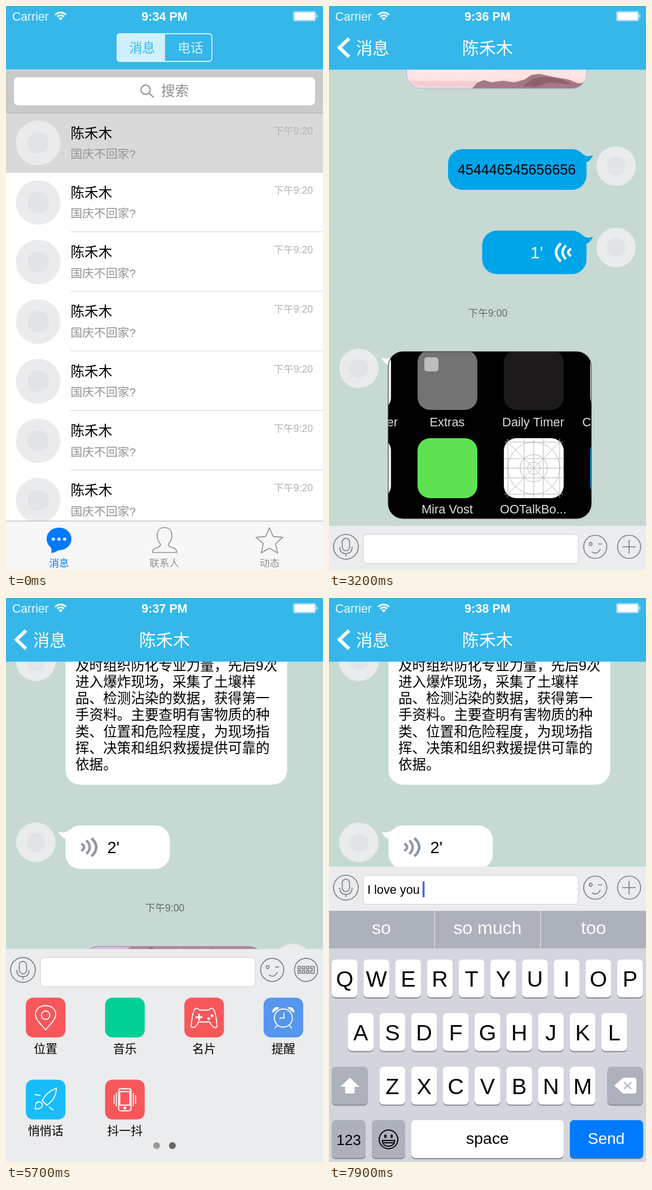
Recreate the animation shown at these times as an HTML page with a canvas. Size 562 by 997 pixels, loop 8 s.

```html
<!DOCTYPE html>
<html lang="zh-CN">
<head>
<meta charset="utf-8">
<title>Chat demo</title>
<style>
html, body { margin: 0; width: 100%; height: 100%; overflow: hidden; }
canvas { display: block; }
</style>
</head>
<body>
<canvas id="stage" width="562" height="997"></canvas>
<script>
const ctx = document.getElementById('stage').getContext('2d');
const LOOP = 8000, W = 562, H = 997;
const BLUE = '#35b7ea', BUBBLE = '#00a4e9', GRAY = '#929292', BAR = '#ebecee', KEY = '#adb1bc';
const CONTACT = '陈禾木';

// ---------- helpers ----------
function box(x, y, w, h, color, r = 0) {
  ctx.fillStyle = color;
  ctx.beginPath();
  ctx.roundRect(x, y, w, h, r);
  ctx.fill();
}
function frame(x, y, w, h, color, r, width = 1.5) {
  ctx.strokeStyle = color;
  ctx.lineWidth = width;
  ctx.beginPath();
  ctx.roundRect(x, y, w, h, r);
  ctx.stroke();
}
function text(s, x, y, size, color, align = 'left', weight = 300) {
  ctx.font = `${weight} ${size}px "Liberation Sans", "Noto Sans CJK SC", "Noto Sans CJK", sans-serif`;
  ctx.textAlign = align;
  ctx.fillStyle = color;
  ctx.fillText(s, x, y);
}
function fill(d, color) {
  ctx.fillStyle = color;
  ctx.fill(new Path2D(d));
}
function line(d, color, width = 1.6) {
  ctx.strokeStyle = color;
  ctx.lineWidth = width;
  ctx.stroke(new Path2D(d));
}
function oval(x, y, rx, ry, color) {
  ctx.fillStyle = color;
  ctx.beginPath();
  ctx.ellipse(x, y, rx, ry, 0, 0, 7);
  ctx.fill();
}
const disc = (x, y, r, color) => oval(x, y, r, r, color);
const ring = (x, y, r) => `M${x + r} ${y}a${r} ${r} 0 1 1 ${-2 * r} 0a${r} ${r} 0 1 1 ${2 * r} 0`;
function at(x, y, draw) {
  ctx.save();
  ctx.translate(x, y);
  draw();
  ctx.restore();
}
function gradient(x, y, ...stops) {
  const g = ctx.createLinearGradient(0, 0, x, y);
  stops.forEach(([p, c]) => g.addColorStop(p, c));
  return g;
}
function seeded(seed) {
  return () => (seed = (seed * 16807) % 2147483647) / 2147483647;
}

// ---------- shared parts ----------
function statusBar(clock) {
  text('Carrier', 11, 25.5, 21.2, '#eefaff');
  text(clock, 281, 25.5, 21.5, '#fff', 'center', 700);
  for (const r of [13, 8]) {
    ctx.strokeStyle = '#fff';
    ctx.lineWidth = 2.8;
    ctx.beginPath();
    ctx.arc(97, 24.5, r, -2.4, -0.74);
    ctx.stroke();
  }
  fill('M97 25.5l-4-4q4-3 8 0z', '#fff');
  frame(509.7, 9.7, 39.3, 16.6, '#ffffffb0', 3, 1.2);
  box(511, 11, 36.7, 14, '#fff', 2);
  box(550.5, 15, 1.7, 6, '#ffffffc0', 1);
}
function avatar(x, y, r) {
  disc(x, y, r, '#e9ebed');
  disc(x, y, r * 0.48, '#e1e3e5');
}

// ---------- conversation list ----------
function listScreen() {
  box(0, 0, W, H, '#fff');
  box(0, 189, W, 106, '#d9d9d9');
  for (let i = 0; i < 7; i++) {
    const y = 105.3 * i;
    avatar(57, 242 + y, 39.5);
    text(CONTACT, 114.5, 233.5 + y, 24.6, '#000');
    text('国庆不回家?', 114.5, 269 + y, 20.8, GRAY);
    text('下午9:20', 544, 226.5 + y, 17.6, '#b3b3b3', 'right');
    if (i) box(114.5, 293 + y, W, 1.7, '#e3e3e5');
  }
  box(0, 112, W, 77.5, '#c9cbcb');
  box(0, 188.5, W, 1.2, '#b4b6b7');
  box(14, 126, 534, 49.5, '#fff', 8);
  line(ring(247.5, 148, 8.2) + 'M253.5 154l8 7.5', '#8e8e93', 2);
  text('搜索', 275, 159, 24.6, '#8e8e93');

  box(0, 0, W, 112, BLUE);
  box(0, 112, W, 1, '#d5e3e8');
  box(196, 48, 86, 51, '#cff0fd', [6, 0, 0, 6]);
  frame(197, 49, 168, 49, '#cff0fd', 6, 1.8);
  text('消息', 241.5, 82, 22.8, BLUE, 'center');
  text('电话', 327, 82, 22.8, '#cff0fd', 'center');

  box(0, 910, W, 87, '#f7f7f7');
  box(0, 910, W, 1, '#a9a9a9');
  oval(94, 942, 22, 20, '#007aff');
  fill('M78 952q4 8 2 15q9-1 14-6z', '#007aff');
  for (const x of [84, 94, 104]) disc(x, 942.5, 2.8, '#fff');
  line('M281 922c-9 0-13 6-13 14 0 7 3 12 6 15 0 4-2 5-5 6-6 2-9 3-9 9h43c0-6-4-7-9-9-4-1-6-2-6-6 3-3 6-8 6-15 0-8-4-14-13-14z', GRAY, 1.7);
  const star = Array.from({ length: 10 }, (_, i) => {
    const r = i % 2 ? 11.5 : 24.5, a = i * Math.PI / 5;
    return [467 + r * Math.sin(a), 947 - r * Math.cos(a)];
  });
  line('M' + star.join('L') + 'z', GRAY, 1.7);
  ['消息', '联系人', '动态'].forEach((s, i) =>
    text(s, 94 + 186.7 * i, 990.5, 17.6, i ? GRAY : '#007aff', 'center'));
}

// ---------- chat bubbles ----------
// Body and tail of a bubble; left bubbles mirror right ones.
function bubblePath(x, y, w, h, left) {
  const body = new Path2D(), mx = v => left ? 561 - v : v;
  body.roundRect(x, y, w, h, 26);
  const tail = new Path2D(`M${mx(446)} ${y + 6}Q${mx(457)} ${y + 16} ${mx(468)} ${y + 10.5}Q${mx(465)} ${y + 21} ${mx(451)} ${y + 26}z`);
  return [body, tail];
}
function bubble(x, y, w, h, color, left) {
  ctx.fillStyle = color;
  bubblePath(x, y, w, h, left).forEach(p => ctx.fill(p));
}
function picture(x, y, w, h, tailColor, edge, left, draw) {
  const [body, tail] = bubblePath(x, y, w, h, left);
  ctx.fillStyle = tailColor;
  ctx.fill(tail);
  ctx.save();
  ctx.clip(body);
  at(x, y, draw);
  ctx.restore();
  ctx.strokeStyle = edge;
  ctx.lineWidth = 1;
  ctx.stroke(body);
}
function waves(x, y, dir, color, count) {
  const arcs = [[2, 7, 6.5, 4.2], [11, 17, 12, 4.2], [20, 28.5, 16, 4.6]];
  for (const [end, peak, h, width] of arcs.slice(0, count))
    line(`M${x + dir * end} ${y - h}Q${x + dir * (2 * peak - end)} ${y} ${x + dir * end} ${y + h}`, color, width);
}
const stamp = y => text('下午9:00', 281.5, y, 17.6, '#646b68', 'center');

function sky() {
  box(0, 0, 320, 323, gradient(0, 323, [0, '#dbb6db'], [0.2, '#e2c4e6'], [0.38, '#ebdcf4'], [0.58, '#f2e9f8'], [0.8, '#fceef4'], [0.93, '#fde6e4'], [1, '#f8cfd0']));
  ctx.filter = 'blur(9px)';
  oval(10, 25, 28, 34, '#d9cdf0');
  oval(170, 10, 130, 38, '#dab5da');
  oval(295, 35, 32, 35, '#d9c8ec');
  oval(265, 92, 26, 16, '#e0c0e3');
  oval(65, 110, 60, 20, '#ece2f8');
  oval(22, 150, 24, 12, '#edd6f0');
  oval(235, 158, 70, 18, '#efe6fa');
  ctx.filter = 'blur(3px)';
  oval(245, 279, 58, 7, '#fad9d9');
  oval(235, 291, 75, 5, '#fde0dd');
  ctx.filter = 'none';
  box(0, 309, 140, 8, '#f3cdd2');
  fill('M115 323l10-11 12-5 14 4 20-3 20 3 18-5 12-8 14-2 24 5 28 5 18 7 15-3v13z', '#a67883');
  fill('M205 318l20-14 24-3 30 6 14 8-40-4-24 8z', '#8d626e');
}

function lake() {
  const rnd = seeded(11);
  const treeTop = x => 62 + x * 0.12 + Math.max(0, x - 190) * 0.45;
  // mountain side
  box(0, 0, 320, 175, gradient(0, 175, [0, '#b38793'], [0.5, '#a27683'], [1, '#74535f']));
  fill('M0 0h85L55 17 25 24 0 42z', '#dbbdd3');
  for (let i = 0; i < 260; i++) {
    const x = rnd() * 320, y = Math.max(0, 85 - x) * 0.45 + 6 + rnd() * 130, s = 3 + rnd() * 11;
    fill(`M${x} ${y}l${s} ${-s * 0.6}l${s * 0.5} ${s * 0.3}l${-s} ${s * 0.7}z`, rnd() > 0.5 ? '#c598a570' : '#5c3e4a70');
  }
  // forest, thinning out towards the right
  let edge = 'M0 168';
  for (let x = 0; x <= 320; x += 4) edge += `L${x} ${treeTop(x) + 14 * rnd()}`;
  fill(edge + 'V168z', '#30222a');
  for (let i = 0; i < 190; i++) {
    const x = rnd() * 320, y = treeTop(x) + 2 + rnd() * (155 - treeTop(x)), s = 9 + rnd() * 14;
    fill(`M${x} ${y - s}l3 ${s}h-6z`, ['#241a20', '#30222a', '#3c2c34'][i % 3]);
  }
  for (let i = 0; i < 55; i++) {
    const x = rnd() * 280, y = treeTop(x) - rnd() * 34, s = 5 + rnd() * 7;
    fill(`M${x} ${y - s}l2.5 ${s}h-5z`, '#4a333d');
  }
  for (let i = 0; i < 40; i++) {
    const x = 205 + rnd() * 115;
    oval(x, 128 + rnd() * 34, 3 + rnd() * 5, 2 + rnd() * 2, i % 2 ? '#a87d8a' : '#49343d');
  }
  box(0, 164, 320, 4, '#6d505d');
  box(0, 168, 320, 8, '#a08ba6');
  // water with vertical reflections and stones
  box(0, 175, 320, 170, gradient(0, 345, [0.5, '#45323b'], [0.7, '#533c45'], [0.85, '#6e4f5a'], [1, '#6d4d57']));
  box(0, 175, 320, 170, gradient(320, 0, [0, '#2a1d2440'], [0.55, '#6a4b5600'], [0.75, '#9a748060'], [1, '#8b667260']));
  ctx.filter = 'blur(2px)';
  for (let i = 0; i < 60; i++) {
    const x = rnd() * 320;
    box(x, 178 + rnd() * 30, 2 + rnd() * 7, 30 + rnd() * 55, x > 195 ? '#a27b8730' : '#2d202730');
  }
  ctx.filter = 'none';
  for (const [x, y, r] of [[12, 234, 12], [164, 217, 9], [90, 275, 15], [28, 286, 30], [200, 293, 22], [154, 250, 20], [300, 290, 30], [124, 299, 34], [292, 208, 8], [40, 240, 14], [260, 282, 12]]) {
    oval(x, y, r, r * 0.18, '#36262ed0');
    oval(x, y - 2, r * 0.6, 1.2, '#85626e80');
  }
}

function homeScreen() {
  const label = (s, x, y, align = 'center') => text(s, x, y, 21.9, '#ddd', align);
  box(0, 0, 360, 295, '#000');
  box(-101, -3, 106, 106, '#eee', 22);
  box(-101, 153, 106, 106, '#eee', 22);
  box(358, -3, 106, 106, '#ddd', 22);
  box(358, 153, 106, 106, BUBBLE, 22);
  box(52, -3, 106, 106, '#737373', 22);
  box(64, 10, 25, 25, '#bdbdbd', 5);
  box(205, -3, 106, 106, '#1c1a1b', 22);
  box(52, 153, 106, 106, '#5ee253', 22);
  box(205, 153, 106, 106, '#fff', 22);
  at(258, 206, () => {
    let d = ring(0, 0, 11) + ring(0, 0, 24) + ring(0, 0, 46) + 'M-47-47L47 47M47-47L-47 47';
    for (const p of [-46, -17, 0, 17, 46]) d += `M${p}-52V52M-52 ${p}H52`;
    line(d, '#b5b5b5', 1);
  });
  label('er', 17, 132, 'right');
  label('Extras', 104.5, 132);
  label('Daily Timer', 257, 132);
  label('C', 344, 132, 'left');
  label('Mira Vost', 104.5, 286);
  label('OOTalkBo...', 257, 286);
}

function earlierMessages(bars) {
  picture(137.5, 136, 319, 322, '#d8c9ee', '#9bbcf0', false, sky);
  avatar(509, 165, 35);
  bubble(211, 565, 245.5, 72, BUBBLE);
  text('454446545656656', 228, 610, 25.1, '#000');
  avatar(509, 595, 35);
  bubble(271.5, 709, 185, 77, BUBBLE);
  text("1'", 357, 758, 30, '#fff');
  waves(431, 747.5, -1, '#fff', bars);
  avatar(509, 739, 35);
  stamp(861);
  avatar(53, 952.5, 35);
  picture(105, 923, 360, 295, '#fff', '#222', true, homeScreen);
}

const REPORT = ['及时组织防化专业力量，先后9次', '进入爆炸现场，采集了土壤样', '品、检测沾染的数据，获得第一',
  '手资料。主要查明有害物质的种', '类、位置和危险程度，为现场指', '挥、决策和组织救援提供可靠的', '依据。'];

function laterMessages() {
  avatar(53, 112, 35);
  box(105.5, 60, 393, 270, '#fff', 26);
  REPORT.forEach((s, i) => text(s, 123, 127.5 + 29.3 * i, 24.6, '#000'));
  avatar(53, 432, 35);
  bubble(105.5, 402, 185, 77, '#fff', true);
  waves(131.5, 440.5, 1, '#8b97a2', 3);
  text("2'", 179.5, 451, 29, '#000');
  stamp(553.5);
  picture(137.5, 616, 319, 322, '#a57c90', '#8d83a8', false, lake);
  avatar(509, 646, 35);
}

// ---------- input area ----------
function inputBar(y, keyboardIcon) {
  const ink = '#777b7e';
  box(0, y, W, H - y, BAR);
  box(61, y + 15, 381, 52, '#fff', 6);
  frame(61, y + 15, 381, 51.5, '#d5d8da', 6, 1.3);
  at(30, y + 37, () => {
    line(ring(0, 0, 22) + 'M-6.5-8.5a6.5 6.5 0 0 1 13 0v9a6.5 6.5 0 0 1-13 0zM-11 0q0 12 11 12t11-12M0 12v5', ink);
  });
  at(472, y + 37, () => line(ring(0, 0, 20.5) + ring(-8, -5, 2.6) + 'M5-5h7M-6 9q10 6 15-5', ink));
  at(532, y + 37, () => {
    let d = ring(0, 0, 20.5);
    if (keyboardIcon) {
      for (const x of [-14.5, -7, 0.5]) for (const v of [-6, 1.5]) d += `M${x} ${v}h4.5v4.5h-4.5z`;
      d += 'M8-6h6.5v12h-6.5v-4.5h3v-4h-3z';
    } else d += 'M-12 0h24M0-12v24';
    line(d, ink);
  });
}

// Each entry: label, tile colour, stroked glyph, filled glyph.
const RED = '#f8575a', GREEN = '#00d096', CYAN = '#18bcf9', INDIGO = '#5596ef';
const PAGES = [
  [
    ['照片', GREEN, 'M-20-16h40v32h-40zM-20 10l12-13 10 10 7-6 11 9' + ring(10, -7, 3)],
    ['拍照', CYAN, 'M-21-11h10l4-6h14l4 6h10v27h-42z' + ring(0, 2, 8)],
    ['短视频', RED, 'M-21-13h28v26h-28zM7-4l14-8v24l-14-8'],
    ['视频电话', INDIGO, 'M-20-14h40v26h-40zM-8 19h16M-5-8l11 7-11 7z'],
    ['红包', RED, 'M-15-20h30v40h-30zM-15-8q15 12 30 0' + ring(0, -1, 4)],
    ['文件', INDIGO, 'M-20-14h14l4 5h22v24h-40z'],
    ['收藏', GREEN, 'M0-20l6 13 14 2-10 10 2 14-12-7-12 7 2-14-10-10 14-2z'],
    ['语音电话', CYAN, 'M-14-18l7 0 4 11-6 4q4 9 12 12l4-6 11 4v7q-4 5-10 4q-22-5-26-26q0-8 4-10z'],
  ],
  [
    ['位置', RED, 'M0 22C-8 12-18 4-18-6a18 15 0 0 1 36 0C18 4 8 12 0 22z' + ring(0, -4, 7.5)],
    ['音乐', GREEN],
    ['名片', RED, 'M-15-16q4-1 7 3h16q3-4 7-3 5 2 8 30 0 4-4 4-5-1-9-10h-20q-4 9-9 10-4 0-4-4 3-28 8-30z',
      'M-15-2h4.5v-4.5h3v4.5h4.5v3h-4.5v4.5h-3v-4.5h-4.5z' + ring(8, 2, 2.5) + ring(14, -3, 2.5)],
    ['提醒', INDIGO, ring(0, 1, 16) + 'M1-9v10h-8M-11 14l-4 5M11 14l4 5', 'M-19-8a8 8 0 0 1 12-9zM19-8a8 8 0 0 0-12-9z'],
    ['悄悄话', CYAN, 'M19-20Q1-13-6 2l8 8Q19-1 19-20zM-19-9l10 2M6 13l8 6M-18 17q-1-13 6-13 7 1 6 7-2 6-12 6z'],
    ['抖一抖', RED, 'M-7-19h14q4 0 4 4v31q0 4-4 4h-14q-4 0-4-4v-31q0-4 4-4zM-9-14h18v24h-18zM-15-12v24M15-12v24M-19-8v16M19-8v16', ring(0, 15, 2.5)],
  ],
];
function panel(page) {
  PAGES[page].forEach(([label, color, stroke, solid], i) => {
    const x = 70.2 + 140.5 * (i % 4), y = 741.5 + 145 * (i >> 2);
    box(x - 35, y - 35, 70.2, 70.2, color, 13);
    at(x, y, () => {
      if (stroke) line(stroke, '#fff', 1.8);
      if (solid) fill(solid, '#fff');
    });
    text(label, x, y + 62, 21, '#000', 'center');
  });
  [267, 295].forEach((x, i) => disc(x, 968, 6, i === page ? '#666' : '#999'));
}

function key(x, y, w, color) {
  box(x, y + 2, w, 67, '#888a8f', 7);
  box(x, y, w, 67, color, 7);
}
function keyboard(words, shifted) {
  box(0, 553, W, 444, '#d2d5dc');
  words.forEach((s, i) => {
    box(188 * i, 553, 186.3, 66.5, KEY);
    text(s, 93 + 188 * i, 594, 32, '#fff', 'center');
  });
  [['QWERTYUIOP', 5], ['ASDFGHJKL', 33.3], ['ZXCVBNM', 89.5]].forEach(([row, left], r) => {
    const y = 639 + 94.8 * r;
    [...row].forEach((c, i) => {
      const x = left + 56.2 * i;
      key(x, y, 45.7, '#fff');
      text(c, x + 22.9, y + 48, 39.5, '#000', 'center');
    });
  });
  key(5, 828.5, 63.5, shifted ? '#fff' : KEY);
  fill('M37 848l17 16h-8.5v9q0 3-3 3h-11q-3 0-3-3v-9h-8.5z', shifted ? '#000' : '#fff');
  key(493.5, 828.5, 63, KEY);
  fill('M506 862l13-12q2-2 4-2h18q4 0 4 4v20q0 4-4 4h-18q-2 0-4-2z', '#fff');
  line('M523 856l13 12M536 856l-13 12', KEY, 2);
  key(5, 923, 60, KEY);
  key(76, 923, 59, KEY);
  key(146, 923, 270, '#fff');
  key(427, 923, 130, '#007aff');
  text('123', 35, 966.5, 26, '#000', 'center');
  text('space', 281, 965, 28.4, '#000', 'center');
  text('Send', 491.5, 965, 28, '#fff', 'center');
  at(105.5, 957, () => {
    line(ring(0, 0, 16.5), '#000', 2);
    oval(-5.5, -5.5, 2, 3.2, '#000');
    oval(5.5, -5.5, 2, 3.2, '#000');
    line('M-11 2h22q-1 10-11 10t-11-10zM-9 6h18', '#000', 2);
  });
}
function typed(s, cursor) {
  text(s, 68, 523, 21.7, '#000');
  box(67 + ctx.measureText(s).width, 501, 3.6, 28, cursor);
}

// ---------- timeline ----------
function chatScreen(t) {
  box(0, 0, W, H, '#c6dad3');
  if (t < 4200) {
    const bars = t < 2400 || t >= 3200 ? 3 : t < 2800 ? 1 : 2;
    at(0, t < 1600 ? 0 : -312, () => earlierMessages(bars));
  } else laterMessages();

  const panelOpen = t >= 4900 && t < 6500;
  inputBar(t < 4900 ? 919 : panelOpen ? 620.4 : 475, panelOpen);
  if (panelOpen) panel(t < 5700 ? 0 : 1);
  if (t >= 6500) {
    const [words, entry, cursor] =
      t < 7300 ? [['I', 'The', "I'm"], '', '#bccdf1'] :
      t < 7900 ? [['you', 'my', 'the'], 'I love ', '#4a69d9'] :
                 [['so', 'so much', 'too'], 'I love you ', '#4a69d9'];
    keyboard(words, t < 7300);
    typed(entry, cursor);
  }

  box(0, 0, W, 112.4, BLUE);
  line('M35.5 57.5L18.5 73.5L35.5 90', '#fff', 6);
  text('消息', 48, 84.5, 29.3, '#fff');
  text(CONTACT, 281, 84.5, 30, '#fff', 'center', 500);
}

function render(now) {
  const t = now % LOOP;
  if (t < 800) listScreen(); else chatScreen(t);
  statusBar(t < 1600 ? '9:34 PM' : t < 4200 ? '9:36 PM' : t < 6500 ? '9:37 PM' : '9:38 PM');
}
const start = performance.now();
function tick() {
  render(performance.now() - start);
  requestAnimationFrame(tick);
}
tick();
</script>
</body>
</html>
```
